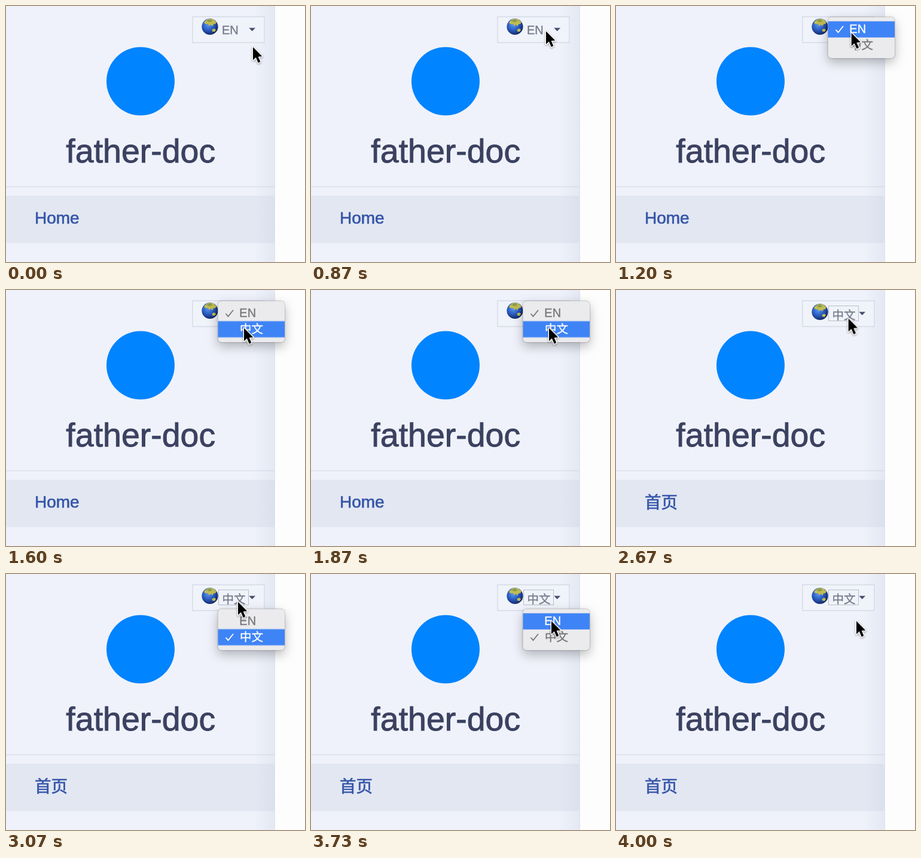
These frames come from a looping animation (500 px wide and 427 px high, 4070 ms). An HTML page:

```html
<!DOCTYPE html>
<html lang="en">
<head>
<meta charset="utf-8">
<title>Language switch</title>
<style>
  html, body { margin: 0; width: 100%; height: 100%; overflow: hidden; background: #fefdfe; }
  svg { display: block; width: 500px; height: 427px; }
  text { font-family: "Liberation Sans", "Noto Sans CJK SC", "Noto Sans CJK", sans-serif; }

  /* Hard switches share one 4.07 s loop */
  .en, .zh, .menu, .shift, .bar, .row-en, .row-zh, .globe { animation: 4.07s step-end infinite; }
  .en { animation-name: en; }
  .zh { animation-name: zh; }
  .globe { animation-name: globe; }
  .menu { animation-name: menu; }
  .shift { animation-name: shift; }
  .bar { animation-name: bar; }
  .row-en { animation-name: row-en; }
  .row-zh { animation-name: row-zh; }
  .cursor { animation: cursor 4.07s ease-in-out infinite; }
  .panel { filter: drop-shadow(0 0 1px #0006) drop-shadow(0 7px 9px #0004); }
  .check { fill: none; stroke: currentColor; stroke-width: 1.8; }
  .row-en text, .row-zh text { fill: currentColor; stroke: currentColor; stroke-width: .35; }

  @keyframes en { 0% { opacity: 1 } 49.14%, 100% { opacity: 0 } }
  @keyframes zh { 0% { opacity: 0 } 49.14%, 100% { opacity: 1 } }
  @keyframes globe {
    0% { transform: none }
    49.14%, 100% { transform: translateY(2px) }
  }
  @keyframes menu {
    0% { opacity: 0 }
    22.85% { opacity: 1 }
    47.42% { opacity: .5 }
    49.14% { opacity: 0 }
    71.99% { opacity: 1 }
    96.56% { opacity: .5 }
    98.28%, 100% { opacity: 0 }
  }
  @keyframes shift {
    0% { transform: none }
    60%, 100% { transform: translateY(40px) }
  }
  @keyframes bar {
    0% { transform: none; opacity: 1 }
    31.2% { transform: translateY(26.5px); opacity: 1 }
    44.23% { transform: translateY(26.5px); opacity: 0 }
    45.95% { transform: translateY(26.5px); opacity: 1 }
    80.3% { transform: none; opacity: 1 }
    95.09% { transform: none; opacity: 0 }
    96.56%, 100% { transform: none; opacity: 1 }
  }
  @keyframes row-en {
    0% { color: #fff }
    31.2% { color: #77777b }
    80.3% { color: #fff }
    95.09% { color: #77777b }
    96.56%, 100% { color: #fff }
  }
  @keyframes row-zh {
    0% { color: #77777b }
    31.2% { color: #fff }
    44.23% { color: #77777b }
    45.95% { color: #fff }
    80.3%, 100% { color: #77777b }
  }
  @keyframes cursor {
    0%, 1.72% { transform: translate(413px, 68.5px) }
    11.55%, 27.8% { transform: translate(393px, 42px) }
    34.4%, 58.9% { transform: translate(398px, 63.5px) }
    67.1%, 76.9% { transform: translate(388px, 46.5px) }
    81.8% { transform: translate(399.5px, 74px) }
    85.3%, 100% { transform: translate(402px, 78.5px) }
  }
</style>
</head>
<body>
<svg viewBox="0 0 500 427">
  <defs>
    <linearGradient id="edge">
      <stop offset="0" stop-color="#c8d0e2" stop-opacity="0"/>
      <stop offset="1" stop-color="#c8d0e2" stop-opacity=".3"/>
    </linearGradient>
    <radialGradient id="sea" cx=".4" cy=".38" r=".64">
      <stop offset="0" stop-color="#5a98ee"/>
      <stop offset=".5" stop-color="#2c5fc6"/>
      <stop offset="1" stop-color="#122764"/>
    </radialGradient>
    <clipPath id="disc"><circle cx="341" cy="34.5" r="13.6"/></clipPath>
  </defs>

  <!-- Sidebar -->
  <rect width="450" height="427" fill="#eff2fa"/>
  <rect y="300.7" width="450" height="1.6" fill="#dbe0eb"/>
  <rect y="316.5" width="450" height="79" fill="#e3e7f2"/>
  <rect x="414" width="36" height="427" fill="url(#edge)"/>
  <rect x="449" width="1" height="427" fill="#dfe3ec"/>

  <circle cx="225" cy="125.5" r="57" fill="#0084ff"/>
  <text x="225.3" y="260.8" font-size="55.5" text-anchor="middle" fill="#3b4160" stroke="#3b4160" stroke-width=".9">father-doc</text>
  <g font-size="28" fill="#3556a8" stroke="#3556a8" stroke-width=".7">
    <text class="en" x="48" y="363.3">Home</text>
    <text class="zh" x="48" y="363.8" font-size="27.5">首页</text>
  </g>

  <!-- Language select -->
  <rect x="312" y="18" width="120" height="43" fill="#f0f3fa" stroke="#d7dce6" stroke-width="1.6"/>
  <g class="globe">
    <circle cx="341" cy="34.5" r="13.6" fill="url(#sea)"/>
    <g clip-path="url(#disc)" fill="#c2bb52">
      <path d="M333 25L338 21.5L346 21.5L352 27L350 30L347 30.5L345 34L342.5 31L340 33.5L338 30L334 30.5L331 28Z"/>
      <path d="M344.5 39.5L348 37.5L351 39.5L349 43L345 42.5Z"/>
      <path d="M335 24.5L341 22.5L346 25L340 27Z" fill="#83994a"/>
    </g>
  </g>
  <g fill="#767b8b" stroke="#767b8b" stroke-width=".35" font-size="20">
    <text class="en" x="361" y="46.8">EN</text>
    <g class="zh">
      <text x="361.5" y="48.7" font-size="19.5">中文</text>
      <rect x="355.5" y="26.5" width="50" height="25" fill="none" stroke="#83889a" stroke-width="1" stroke-dasharray="1 1"/>
    </g>
  </g>
  <path d="M406.3 36.5h10.8l-5.4 5.4z" fill="#454d6b"/>

  <!-- Popup -->
  <g class="menu"><g class="shift">
    <rect class="panel" x="354.5" y="18.5" width="111.5" height="68.5" rx="6" fill="#ebebed"/>
    <rect class="bar" x="354.5" y="25.5" width="111.5" height="27" fill="#3f84f6"/>
    <g class="row-en">
      <path class="check en" d="M367.5 39.5l4 4.5 8.5-10.5"/>
      <text x="390.3" y="45" font-size="20">EN</text>
    </g>
    <g class="row-zh">
      <path class="check zh" d="M367.5 66l4 4.5 8.5-10.5"/>
      <text x="391" y="72.3" font-size="19.5">中文</text>
    </g>
  </g></g>

  <g class="cursor">
    <path d="M0 0V21.8L4.9 17.3L8.7 26.2L12.4 24.6L8.6 15.9L15.4 15.4Z" fill="#000" stroke="#fff" stroke-width="3"
      stroke-linejoin="round" paint-order="stroke" style="filter: drop-shadow(0 1.5px 1.5px #0006)"/>
  </g>
</svg>
</body>
</html>
```
